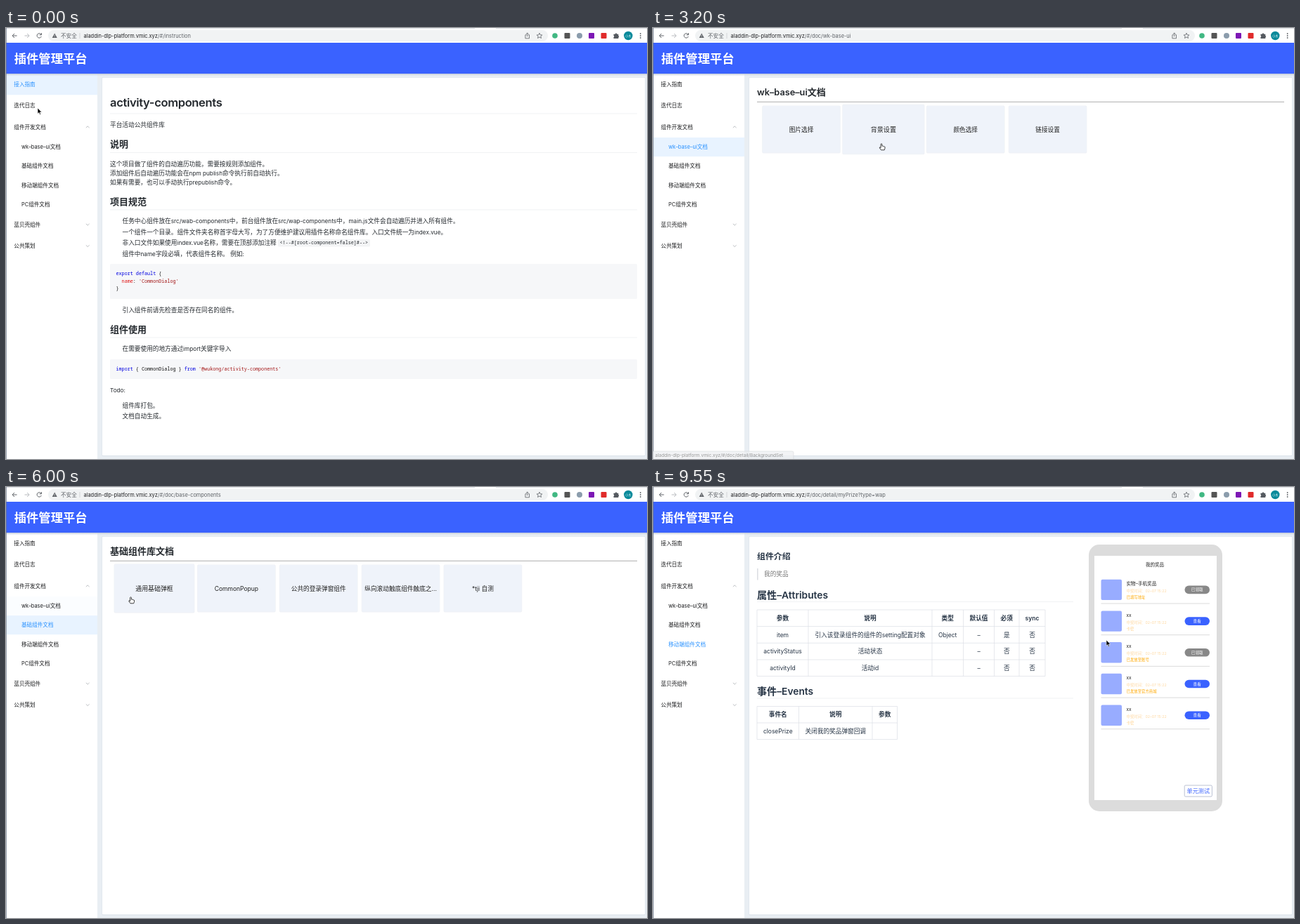
These frames come from a looping animation (912 by 614 pixels, 9.65 s). An HTML page:

```html
<!DOCTYPE html>
<html lang="zh-CN">
<head>
<meta charset="utf-8">
<style>
html, body { margin: 0; width: 100%; height: 100%; overflow: hidden; background: #fff; }
svg { display: block; width: 912px; height: 614px; }
text { white-space: pre; font-family: Inter, "Noto Sans CJK SC", "Noto Sans CJK", sans-serif; }
.mono { font: 500 6.75px "Noto Sans Mono", monospace; }
.page { display: none; }
</style>
</head>
<body>
<svg id="stage" viewBox="0 0 912 614"></svg>
<script>
const LOOP = 9650, BLUE = '#3a62ff', INK = '#24292e', NAVY = '#263445', LINE = '#eaecef';
const HOST = 'aladdin-dlp-platform.vmic.xyz';
let latin = 0.98; // size of Latin runs relative to the Chinese text

const esc = s => s.replace(/&/g, '&amp;').replace(/</g, '&lt;');
const rect = (x, y, x2, y2, fill, more = '') =>
  `<rect x="${x}" y="${y}" width="${x2 - x}" height="${y2 - y}" fill="${fill}" ${more}/>`;
const path = (d, stroke, width = 0.8, more = 'fill="none"') =>
  `<path d="${d}" stroke="${stroke}" stroke-width="${width}" ${more}/>`;
const hline = (y, x1, x2, color = LINE) => path(`M${x1} ${y}H${x2}`, color, 0.7);

// y is the visual middle of the line
function text(x, y, s, size = 8.667, fill = INK, more = '') {
  const body = s.replace(/[!-~–]+/g, run => `<tspan font-size="${size * latin}">${esc(run)}</tspan>`);
  return `<text x="${x}" y="${y + size * 0.37}" font-size="${size}" fill="${fill}" ${more}>${body}</text>`;
}
const mid = (x, y, s, size, fill, more = '') => text(x, y, s, size, fill, 'text-anchor="middle" ' + more);
const bold = (x, y, s, size, fill = INK) => text(x, y, s, size, fill, 'font-weight="600"');
const code = (x, y, ...parts) => `<text class="mono" x="${x}" y="${y + 2.4}">` +
  parts.map(([s, c]) => `<tspan fill="${c}">${esc(s)}</tspan>`).join('') + '</text>';

// rows are strings with cells split by "|" and lines by "\n"
function table(xs, ys, rows, centred = true) {
  const border = centred ? '#dcdfe6' : '#dfe2e5', color = centred ? NAVY : INK;
  const right = xs[xs.length - 1], bottom = ys[ys.length - 1];
  let out = '';
  rows.forEach((row, r) => {
    if (!centred && r && r % 2 == 0) out += rect(xs[0], ys[r], right, ys[r + 1], '#f6f8fa');
    row.split('|').forEach((cell, c) => {
      const lines = cell.split('\n'), weight = r ? '' : 'font-weight="600"';
      lines.forEach((s, k) => {
        const y = (ys[r] + ys[r + 1]) / 2 + (k - (lines.length - 1) / 2) * 12.6;
        out += centred ? mid((xs[c] + xs[c + 1]) / 2, y, s, 8.667, color, weight)
                       : text(xs[c] + 7, y, s, 8.667, color, weight);
      });
    });
  });
  return out + path(ys.map(y => `M${xs[0]} ${y}H${right}`).join('') +
    xs.map(x => `M${x} ${ys[0]}V${bottom}`).join(''), border, 0.7);
}

function docHead(title, right) {
  return text(148, 106, 'activity-components', 17.5, INK, 'font-weight="600" letter-spacing="-.34"') +
    hline(122, 148, right) + text(148, 137.5, '平台活动公共组件库') +
    section(165.5, title, right);
}
const section = (y, title, right) => bold(148, y, title, 13) + hline(y + 12, 148, right);

function instruction() {
  const p = (y, s) => text(165.5, y, s);
  const K = '#0000e0', S = '#a31515', B = '#111';
  return docHead('说明', 898) +
    text(148, 193.5, '这个项目做了组件的自动遍历功能，需要按规则添加组件。') +
    text(148, 206.5, '添加组件后自动遍历功能会在npm publish命令执行前自动执行。') +
    text(148, 219.5, '如果有需要，也可以手动执行prepublish命令。') +
    section(247, '项目规范', 898) +
    p(275, '任务中心组件放在src/wab-components中，前台组件放在src/wap-components中，main.js文件会自动遍历并进入所有组件。') +
    p(290.5, '一个组件一个目录。组件文件夹名称首字母大写，为了方便维护建议用插件名称命名组件库。入口文件统一为index.vue。') +
    p(306, '非入口文件如果使用index.vue名称，需要在顶部添加注释') +
    rect(387, 301, 518, 311.5, '#f3f4f5', 'rx="1.6"') +
    code(389.5, 306, ['<!--#[root-component=false]#-->', INK]) +
    p(321.5, '组件中name字段必填，代表组件名称。 例如:') +
    rect(148, 336, 898, 386, '#f6f7f9', 'rx="1.6"') +
    code(156.5, 350, ['export default', K], [' {', B]) +
    code(156.5, 360.5, ['  name', '#e01010'], [': ', B], ["'CommonDialog'", S]) +
    code(156.5, 371, ['}', B]) +
    p(401.5, '引入组件前请先检查是否存在同名的组件。') +
    section(429, '组件使用', 898) +
    p(457, '在需要使用的地方通过import关键字导入') +
    rect(148, 472, 898, 500, '#f6f7f9', 'rx="1.6"') +
    code(156.5, 485.5, ['import', K], [' { CommonDialog } ', B], ['from ', K], ["'@wukong/activity-components'", S]) +
    text(148, 515.5, 'Todo:') + p(537.5, '组件库打包。') + p(552.5, '文档自动生成。');
}

function version() {
  const head = '序号|名称|目录|内容';
  const release = (y, name, xs, ys, ...rows) =>
    bold(148, y, name, 10.83) + table([148, 180.5, ...xs], ys, [head, ...rows], false);
  return docHead('版本记录', 889) +
    release(198, 'v1.2.1', [289.5, 452.5, 606.5], [213.5, 233.6, 253.8, 274],
      '1|新增babel.import.js|activity-components/babel.import.js|实现组件库的按需加载',
      '2|修改map-components.js|新增组件库按需加载目录自动生成功能|实现组件库按需加载目录的自动生成') +
    release(294.5, 'v1.2.0', [269.5, 425.5, 654], [309.5, 330, 350, 370.3],
      '1|中奖弹窗code/prop|wap-components/PrizeDialog|中奖弹窗适配os2.0，包含了前端侧，配置项，预览修改',
      '2|购机任务弹窗|wap-components/TaskInfo/imeiInput|购机核销弹窗os2.0适配') +
    release(390.5, 'v1.1.1', [230, 363, 699.5], [406, 426.2, 446.4, 466.6],
      '1|基础信息|web-components/ActivityBase|基础信息增加重置功能，修改change触发方式',
      '2|多标签|web-components/MultiTag|新增多标签组件，支持新增、删除、限制标签个数、限制标签字数、禁止编辑等功能') +
    release(487, 'v1.1.0', [230, 359, 596], [502.5, 522.5, 556, 589, 609, 632],
      '1.1|任务列表|wap-components/TaskInfo|新增任务基础组件，后续开发各任务基本保持样式、\n逻辑隔离',
      '1.2|任务列表|wap-components/TaskInfo|新增 绑定手机号、关注云笺服务号\n、添加导购社群 三个任务',
      '1.3|任务列表|wap-components/TaskInfo|合并云笺相关权限获取逻辑，增加config、utils文件夹相关', '');
}

const cardBox = i => ({ x: 211 + i % 6 * 116.85, y: 144.3 + Math.floor(i / 6) * 73.3 });
const list = (title, names) => bold(148, 91, title, 13) + hline(105.3, 148, 898, '#888') +
  names.map((name, i) => {
    const { x, y } = cardBox(i);
    return `<g class="card" transform="translate(${x} ${y})">` +
      rect(-55.8, -33.9, 55.8, 34.3, '#e4e8ee', 'rx="2" opacity=".6"') +
      rect(-55.2, -33.4, 55.2, 33.4, '#eff3fa', 'rx="2"') + mid(0, 0, name, 8.667, '#222') + '</g>';
  }).join('');

const title = s => text(148, 96, s, 19.7, NAVY, 'font-weight="500"');
const intro = (y, quote) => bold(148, y, '组件介绍', 11.92, NAVY) +
  rect(148, y + 17, 149.6, y + 33.5, '#dcdfe3') + text(158, y + 25.2, quote, 8.667, '#777');
const part = (y, s) => bold(148, y, s, 14.08, NAVY) + hline(y + 10, 148, 598);
const phone = (right, bottom, fill) => rect(620, 82, right + 8, bottom + 16, '#dcdcdc', 'rx="15"') +
  rect(628, 98, right, bottom, fill);
const testButton = border => rect(756.2, 425, 795.4, 441, '#fff', `rx="1.6" stroke="${border}" stroke-width=".8"`) +
  mid(775.8, 433, '单元测试', 8.1, BLUE);

function background() {
  const box = (x, x2, fill = '#fff', y = 157) => rect(x, y, x2, y + 17, fill, 'rx="2" stroke="#dcdfe6" stroke-width=".7"');
  return title('component_name') + intro(126.5, '背景设置') + part(180.5, '属性–Attributes') +
    table([148, 247, 378, 429, 528, 561, 598], [202.5, 238, 262, 285.5, 309, 345], [
      '参数|说明|类型|默认值|必\n须|sync',
      'bgType|背景类型 1:颜色 2:图片|Number|1|否|是',
      'bgImg|背景图片链接|String|–|否|是',
      'bgColor|背景颜色|String|rgba(255,255,255,1)|否|是',
      'mediaPickerToBody|图片选择器弹窗append–to–\nbody属性|Boolean|–|否|否']) +
    phone(890, 533, '#fff') + text(636.5, 116, '背景配置', 7.58, '#666') +
    box(636.5, 814, '#fff', 134) + rect(636.5, 134, 725, 151, BLUE, 'rx="2"') +
    mid(681, 142.7, '使用颜色', 7.58, '#fff') + mid(769.5, 142.7, '使用图片', 7.58, '#444') +
    box(636.5, 671.5, '#f5f6f8') + box(676.5, 772) + box(777, 814) +
    text(679, 165, '#', 5.8, '#888') + text(687, 165.5, 'f6f6f6', 7.4, '#555') +
    mid(792, 165.5, '100', 7.4, '#555') + mid(808.5, 165, '%', 5.8, '#888') +
    rect(860.3, 519.3, 886.3, 529.8, '#fff', `rx="1" stroke="${BLUE}" stroke-width=".7"`) +
    mid(873.3, 524.5, '单元测试', 5.4, BLUE);
}

function dialog() {
  return title('CommonDialog') + intro(126.5, '通用基础弹框') + part(180.5, '属性–Attributes') +
    table([148, 223.5, 316, 366.5, 421.5, 457, 494], [202.5, 226, 249.6, 273.2, 296.8, 320.4, 344], [
      '参数|说明|类型|默认值|必须|sync',
      'maskZIndex|弹框的z–index层级|Number|1000|否|否',
      'bgStyle|背景样式|Object|–|否|否',
      'closeBtnPos|关闭按钮的位置|String|top–right|否|否',
      'showCloseBtn|是否展示关闭按钮|Boolean|true|否|否',
      'v–model|是否展示弹框|Boolean|–|否|否']) +
    part(365.5, '事件–Events') +
    table([148, 192.5, 262.5, 298], [387, 410.5, 434, 457.8], ['事件名|说明|参数', 'input|–|', 'close|弹框关闭事件|']) +
    part(479, '插槽–Slots') +
    table([148, 194.5, 247, 290, 339], [500.5, 524, 547.6], ['名称|说明|scope|content', 'default|弹框内容||–']) +
    phone(802, 446, '#5b5b5b') + rect(636, 232, 794, 312, '#ff9d06', 'rx="6"') +
    path('M780.8 239.2l4.2 4.2m0-4.2l-4.2 4.2', '#6b4a1a') +
    mid(715, 264.5, '基础弹窗，可以通过slot插槽，动态添加内', 7.58, '#f00') +
    mid(715, 277, '容', 7.58, '#f00') + testButton('#fff');
}

function prizes() {
  const items = [['实物–手机奖品', '已填写地址', 0], ['xx', '卡密', 1], ['xx', '已发放至账号', 0],
    ['xx', '已发放至官方商城', 1], ['xx', '卡密', 1]];
  return intro(99, '我的奖品') + part(153.5, '属性–Attributes') +
    table([148, 221, 397, 441.5, 485.5, 521, 558], [175, 198.6, 222.3, 246, 269.5], [
      '参数|说明|类型|默认值|必须|sync',
      'item|引入该登录组件的组件的setting配置对象|Object|–|是|否',
      'activityStatus|活动状态||–|否|否', 'activityId|活动id||–|否|否']) +
    part(291, '事件–Events') +
    table([148, 207.5, 312, 347.5], [312.5, 336, 359.6], ['事件名|说明|参数', 'closePrize|关闭我的奖品弹窗回调|']) +
    phone(802, 446, '#fff') + mid(714, 111, '我的奖品', 6.5, '#222') +
    items.map(([name, state, open], i) => {
      const y = 146.4 + i * 44.7;
      return rect(637.5, y - 14.7, 667, y + 14.7, '#98acff', 'rx="2"') +
        text(673.5, y - 9, name, 6.6, '#222') + text(673.5, y + 1.5, '中奖时间：02–07 15:22', 5.4, '#ffd8a0') +
        text(673.5, y + 10.5, state, 5.4, state == '卡密' ? '#ffd08a' : '#ffa800') +
        rect(756.5, y - 5.8, 792, y + 5.8, open ? BLUE : '#888', 'rx="5.8"') +
        mid(774.2, y, open ? '查看' : '已领取', 5.6, '#fff') + hline(y + 19.6, 637.5, 792, '#ccc');
    }).join('') + testButton('#aab2c8');
}

const inMarkdown = draw => { latin = 0.945; const out = draw(); latin = 0.98; return out; };
const detail = s => '/#/doc/detail/' + s;
const pages = [
  { from: 0, menu: 0, url: '/#/instruction', body: inMarkdown(instruction) },
  { from: 1050, menu: 1, url: '/#/version', body: inMarkdown(version), scrolls: true },
  { from: 2450, menu: 2, url: '/#/doc/wk-base-ui', cards: 4,
    body: list('wk–base–ui文档', ['图片选择', '背景设置', '颜色选择', '链接设置']) },
  { from: 3450, menu: 2, body: background(),
    url: detail('BackgroundSet?path=tempDoc%2Fwk-base-ui%2Fbase%2FBackgroundSet.md') },
  { from: 5650, menu: 3, url: '/#/doc/base-components', cards: 5,
    body: list('基础组件库文档', ['通用基础弹框', 'CommonPopup', '公共的登录弹窗组件', '纵向滚动触底组件触底之...', '*tji 自测']) },
  { from: 6550, menu: 3, url: detail('CommonDialog?type=wap'), body: dialog() },
  { from: 7750, menu: 4, url: '/#/doc/wap-components', cards: 11,
    body: list('移动端组件库文档', ['CascaderSelector', 'CheckBoxSelector', '确认弹框', '图片弹窗', '图片样式根据图片高宽，...',
      '中奖弹框code层', '中奖弹框prop层与code层...', 'RadioSelector', '任务列表', 'gitlabHook测试插件', '我的奖品']) },
  { from: 8650, menu: 4, url: detail('myPrize?type=wap'), body: prizes() }
];

const menuNames = ['接入指南', '迭代日志', 'wk–base–ui文档', '基础组件文档', '移动端组件文档', 'PC组件文档'];
const menuTops = [65, 95.3, 156, 183.1, 210.2, 237.3], menuBottom = i => menuTops[i] + (i < 2 ? 30.3 : 27.1);

function toolbar() {
  const grey = '#5f6368';
  const dot = (x, color) => rect(x - 4, 7, x + 4, 15, color, 'rx="1"');
  return rect(0, 0, 912, 21, '#fff') + rect(0, 0, 667, 1, '#dee1e6') + rect(697, 0, 912, 1, '#dee1e6') +
    rect(60, 3, 771, 19, '#f1f3f4', 'rx="8"') +
    path('M15.6 11H9m3-3l-3 3l3 3', grey, 1) + path('M26.5 11h6.6m-3-3l3 3l-3 3', '#b9bcc0', 1) +
    path('M50 9.2A3.2 3.2 0 1 0 50.3 12M50.5 7.2V9.8H47.8', grey, 1) +
    `<path d="M69.2 7.6L72.7 14H65.7Z" fill="${grey}"/>` + path('M69.2 9.8v1.8m0 .7v.8', '#fff', 0.7) +
    text(78, 11, '不安全', 7.58, grey) + path('M105 7V15', '#c4c7cb', 0.7) +
    `<text x="110.5" y="13.6" font-size="7.42" fill="#202124">${HOST}<tspan id="url" fill="${grey}"></tspan></text>` +
    path('M740.5 9.8h-1.6v5h5.6v-5h-1.6M741.7 12.3V7m-1.7 1.6l1.7-1.7l1.7 1.7', grey, 0.8) +
    path('M759 7.2l1.1 2.6l2.8.2l-2.1 1.8l.7 2.7l-2.5-1.5l-2.5 1.5l.7-2.7l-2.1-1.8l2.8-.2z', grey, 0.8) +
    '<circle cx="781" cy="11" r="3.8" fill="#41b883"/>' + dot(798.5, '#555') +
    '<circle cx="816" cy="11" r="4" fill="#8b9cac"/>' + dot(833, '#7d17b5') + dot(850.5, '#e02b2b') +
    '<path d="M864.5 8.8h2.2a1.3 1.3 0 0 1 2.6 0h2v2.2a1.3 1.3 0 0 1 0 2.4v1.6h-6.8v-2a1.2 1.2 0 0 0 0-2.2z" fill="#555a60"/>' +
    '<circle cx="885.3" cy="11" r="6.2" fill="#07899a"/>' + mid(885.3, 11, '小木', 4.2, '#d6f0f2') +
    [8, 11, 14].map(y => `<circle cx="902.7" cy="${y}" r=".9" fill="${grey}"/>`).join('');
}

function sidebar() {
  const arrow = (y, d) => path(`M113.8 ${y - d}l2.4 ${2 * d}l2.4 ${-2 * d}`, '#a0a4aa', 0.7);
  return rect(0, 65, 130, 614, '#fff') +
    menuNames.map((name, i) => {
      const y = (menuTops[i] + menuBottom(i)) / 2;
      return rect(1, menuTops[i], 130, menuBottom(i), '#e8f3ff', 'class="glow"') +
        `<g class="item">${text(i < 2 ? 11.3 : 22, y, name, 7.58, 'inherit')}</g>`;
    }).join('') +
    [['组件开发文档', 141, -1.1], ['蓝贝壳组件', 280, 1.1], ['公共策划', 310.5, 1.1]]
      .map(([s, y, d]) => text(11.3, y, s, 7.58, '#1c1d1f') + arrow(y, d)).join('');
}

const stage = document.getElementById('stage');
stage.innerHTML = '<defs><linearGradient id="shade" x2="0" y2="1"><stop stop-color="#b9c3d6"/>' +
  '<stop offset="1" stop-color="#e9eef3" stop-opacity="0"/></linearGradient></defs>' +
  rect(0, 0, 912, 614, '#e9eef3') +
  pages.map(p => `<g class="page">${p.scrolls
    ? rect(136.5, 70, 901.5, 620, '#dfe5ec') + rect(137, 70.7, 901, 620, '#fff')
    : rect(136.5, 70, 909.5, 610, '#dbe2ea', 'rx="1"') + rect(137, 70.7, 909, 609, '#fff', 'rx="1"')}${p.body}</g>`).join('') +
  sidebar() + rect(0, 65, 912, 69, 'url(#shade)') + rect(0, 21, 912, 65, BLUE) +
  text(11.7, 43.5, '插件管理平台', 17.33, '#fff', 'font-weight="600"') +
  `<g id="scroll">${rect(907, 21, 912, 614, '#fafafa')}${rect(908.3, 23, 911.7, 283, '#c1c1c1', 'rx="1.7"')}</g>` +
  toolbar() + rect(0, 0, 0.7, 614, '#6f7a90') +
  `<g id="status" opacity=".75">${rect(-2, 603, 200, 616, '#eef0f2', 'rx="2" stroke="#d0d3d6" stroke-width=".7"')}` +
  '<text id="link" x="3" y="610.6" font-size="6.54" fill="#777"></text></g>' +
  '<g id="cursor">' + path('M0 0V8.2L1.9 6.5L3.2 9.4L4.5 8.8L3.2 6H5.8Z', '#fff', 0.6, 'fill="#000"') +
  path('M-.9 .4Q0-.9 .9 .4V3.2Q1.9 2.6 2.4 3.5Q3.4 3 3.8 4Q5 3.6 5 4.8V6.3L4.2 8.8H-.5L-2.6 5.9Q-3 4.5-1.8 4.9L-.9 5.7Z',
    '#111', 0.8, 'fill="#fff"') + '</g>';

const $ = id => document.getElementById(id);
const groups = [...stage.querySelectorAll('.page')], glows = [...stage.querySelectorAll('.glow')];
const items = [...stage.querySelectorAll('.item')], cards = groups.map(g => [...g.querySelectorAll('.card')]);
const [arrow, hand] = $('cursor').children;

// [time, x, y] of the pointer tip
const track = [[0, 45, 114], [50, 45, 114], [1000, 37, 110], [1500, 37, 110], [2250, 39, 173], [2450, 39, 173],
  [3050, 325, 165], [3450, 325, 165], [4000, 349, 206], [4450, 215, 214], [4750, 215, 214], [5050, 56, 206],
  [5250, 56, 206], [5450, 40, 199], [5650, 40, 199], [5900, 176, 156], [6000, 177.5, 157], [6300, 186, 152],
  [6600, 186, 152], [7050, 266, 249], [7600, 45, 222], [7750, 45, 222], [8300, 642, 238], [8750, 642, 238],
  [9200, 624, 240], [9450, 624, 240], [9550, 645, 218], [LOOP, 645, 218]];
function pointer(t) {
  const k = track.findIndex(p => p[0] > t), [t0, x0, y0] = track[k - 1], [t1, x1, y1] = track[k];
  const u = (t - t0) / (t1 - t0), e = u * u * (3 - 2 * u);
  return { x: x0 + (x1 - x0) * e, y: y0 + (y1 - y0) * e };
}

const pageAt = t => pages.findLastIndex(p => p.from <= t);
const focus = [[0, 1000], [1000, 2300], [2400, 3350], [5600, 6450], [7700, 8350], [0, 0]];
function overItem(i, t) {
  const { x, y } = pointer(t);
  return t >= 50 && x < 130 && y >= menuTops[i] && y < menuBottom(i);
}
function overCard(i, t) {
  const p = pointer(t), c = cardBox(i);
  return Math.abs(p.x - c.x) < 55 && Math.abs(p.y - c.y) < 33.4;
}
// a 300 ms linear transition of an on/off state
function eased(isOn, t, since = 0) {
  let sum = 0;
  for (let k = 0; k < 12; k++) sum += isOn(Math.max(since, t - k * 25));
  return sum / 12;
}
const lit = (i, t) => overItem(i, t) || (t >= focus[i][0] && t < focus[i][1]);
const links = [[2950, 3500, 'BackgroundSet'], [6200, 6600, 'CommonDialog?type=wap'], [8350, 8650, 'myPrize?type=wap']];

function draw(t) {
  const n = pageAt(t), page = pages[n], p = pointer(t);
  groups.forEach((g, i) => g.style.display = i == n ? 'block' : 'none');
  $('scroll').style.display = page.scrolls ? '' : 'none';
  $('url').textContent = page.url;
  items.forEach((item, i) => {
    item.setAttribute('fill', i == page.menu ? '#2a92ff' : '#1c1d1f');
    glows[i].setAttribute('opacity', eased(s => lit(i, s), t));
  });
  let clickable = menuNames.some((_, i) => overItem(i, t));
  cards[n].forEach((card, i) => {
    const { x, y } = cardBox(i);
    clickable ||= overCard(i, t);
    card.setAttribute('transform', `translate(${x} ${y}) scale(${1 + 0.05 * eased(s => overCard(i, s), t, page.from)})`);
  });
  const link = links.find(([a, b]) => t >= a && t < b);
  $('status').style.display = link ? '' : 'none';
  if (link) $('link').textContent = HOST + detail(link[2]);
  arrow.style.display = clickable ? 'none' : '';
  hand.style.display = clickable ? '' : 'none';
  $('cursor').setAttribute('transform', `translate(${p.x} ${p.y})`);
}

const start = performance.now();
function tick() {
  const t = (performance.now() - start) % LOOP;
  draw(Math.floor(t / 50) * 50);
  requestAnimationFrame(tick);
}
tick();
</script>
</body>
</html>
```
